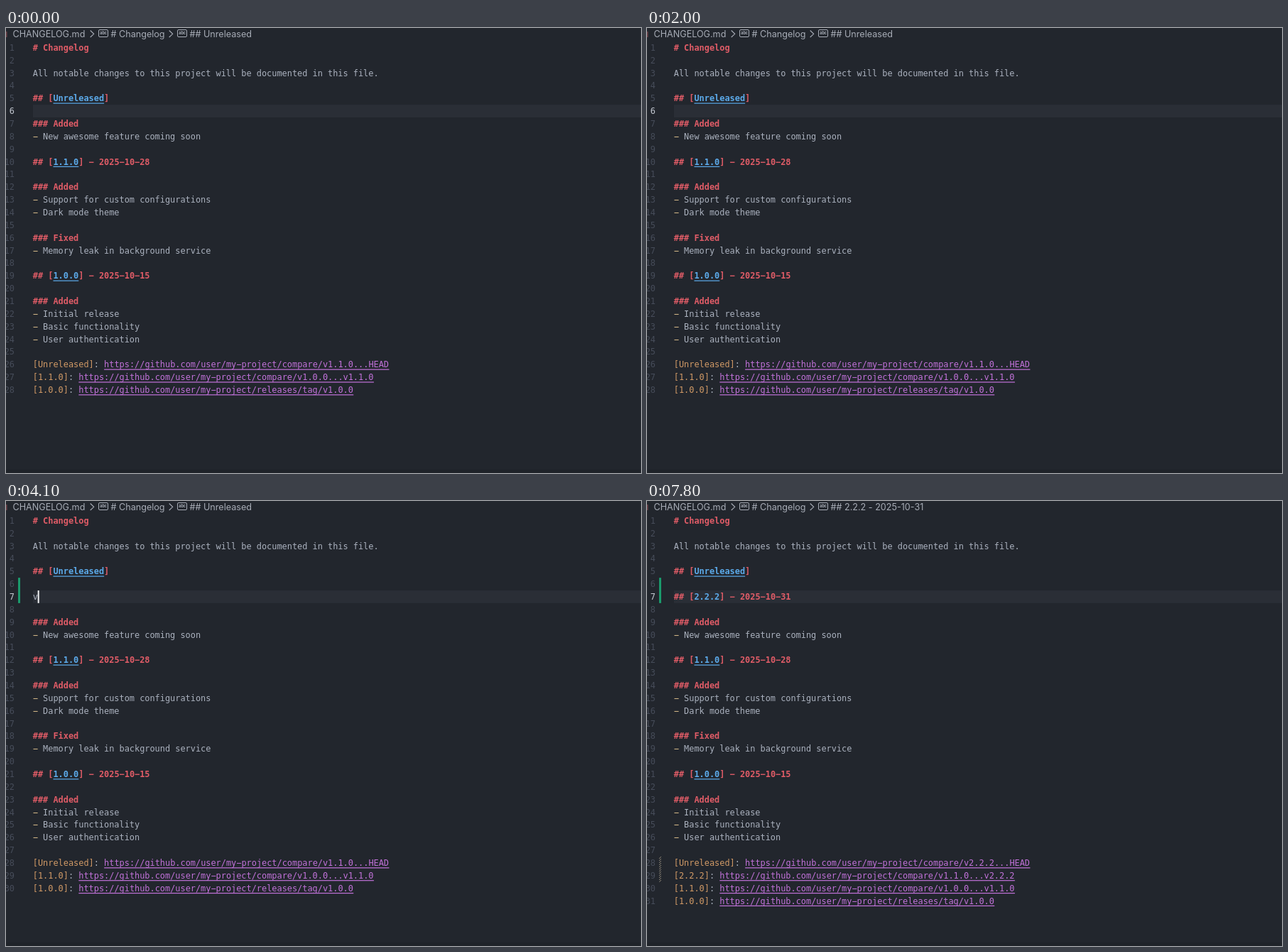
An HTML page with a canvas that plays this animation: 894x627 px, repeating every 8 s.

```html
<!DOCTYPE html>
<html lang="en">
<head>
<meta charset="utf-8">
<title>Changelog editor</title>
<style>
html, body { margin: 0; width: 100%; height: 100%; overflow: hidden; background: #22262d; }
canvas { display: block; width: 894px; height: 627px; }
</style>
</head>
<body>
<canvas id="stage"></canvas>
<script>
const W = 894, H = 627, LOOP = 8000;
const LEFT = 37.8, COL = 7.166, TOP = 18.85, ROW = 17.86;
const MONO = '11.9px "DejaVu Sans Mono", monospace';
const UI = '12.6px Inter, sans-serif';
const C = {
  bg: '#22262d', band: '#2a2e36', text: '#abb2bf', dim: '#464c59',
  red: '#e05c67', blue: '#5cabeb', purple: '#c272da', orange: '#d19a66',
  bullet: '#dcc08e', green: '#1b9a6c', crumb: '#a7acb6'
};
const URL_BASE = 'https://github.com/user/my-project/';

const canvas = document.getElementById('stage');
const ctx = canvas.getContext('2d');
const dpr = window.devicePixelRatio || 1;
canvas.width = W * dpr;
canvas.height = H * dpr;

const compare = (label, from, to) => `[${label}]: ${URL_BASE}compare/v${from}...${to}`;

const BASE = [
  '# Changelog', '',
  'All notable changes to this project will be documented in this file.', '',
  '## [Unreleased]', '',
  '### Added', '- New awesome feature coming soon', '',
  '## [1.1.0] - 2025-10-28', '',
  '### Added', '- Support for custom configurations', '- Dark mode theme', '',
  '### Fixed', '- Memory leak in background service', '',
  '## [1.0.0] - 2025-10-15', '',
  '### Added', '- Initial release', '- Basic functionality', '- User authentication', '',
  compare('Unreleased', '1.1.0', 'HEAD'),
  compare('1.1.0', '1.0.0', 'v1.1.0'),
  `[1.0.0]: ${URL_BASE}releases/tag/v1.0.0`
];

// Edit times in ms
const ENTER1 = 2200, ENTER2 = 2900, UP = 3500, EXPAND = 7100;
const TYPED = 'v2.2.2', TYPE_AT = [4100, 4800, 5000, 5200, 5300, 5400];
const CARET_RESETS = [1400, ENTER1, ENTER2, 3000, UP, ...TYPE_AT, EXPAND];

function editorState(t) {
  const lines = BASE.slice();
  if (t >= ENTER1) lines.splice(5, 0, '');
  if (t >= ENTER2) lines.splice(5, 0, '');
  if (t >= TYPE_AT[0]) lines[6] = TYPED.slice(0, TYPE_AT.filter(k => t >= k).length);
  if (t >= EXPAND) {
    lines[6] = '## [2.2.2] - 2025-10-31';
    lines.splice(27, 1, compare('Unreleased', '2.2.2', 'HEAD'), compare('2.2.2', '1.1.0', 'v2.2.2'));
  }
  const row = t < ENTER1 ? 6 : t < ENTER2 ? 7 : t < UP ? 8 : 7;
  const reset = CARET_RESETS.filter(k => t >= k).pop();
  const caret = reset !== undefined && Math.floor((t - reset) / 500) % 2 === 0;
  return { lines, row, caret };
}

const rowTop = n => TOP + (n - 1) * ROW;

function rect(color, x, y, w, h) {
  ctx.fillStyle = color;
  ctx.fillRect(x, y, w, h);
}

// Splits a Markdown line into [text, color, underlined] parts
function tokens(line) {
  let m;
  if (line[0] === '#') {
    m = line.match(/^(#+ \[)(.+?)(\].*)$/);
    return m
      ? [[m[1], C.red], [m[2], C.blue, m[2] !== '2.2.2'], [m[3], C.red]]
      : [[line, C.red]];
  }
  if ((m = line.match(/^(\[.+?\])(: )(.+)$/)))
    return [[m[1], C.orange], [m[2], C.text], [m[3], C.purple, true]];
  if (line.startsWith('- ')) return [['-', C.bullet], [line.slice(1), C.text]];
  return [[line, C.text]];
}

function drawLine(line, n) {
  const y = rowTop(n);
  let x = LEFT;
  ctx.font = (line[0] === '#' ? 'bold ' : '') + MONO;
  for (const [text, color, underlined] of tokens(line)) {
    const w = text.length * COL;
    ctx.fillStyle = color;
    ctx.fillText(text.replace(/-/g, '\u2212'), x, y + 13); // wide hyphens
    if (underlined) rect(color, x, y + 15.2, w, 1.2);
    x += w;
  }
}

function drawNumber(n, active) {
  ctx.font = MONO;
  ctx.fillStyle = active ? '#c3c8d1' : C.dim;
  ctx.textAlign = 'right';
  ctx.fillText(n, 12, rowTop(n) + 13);
  ctx.textAlign = 'left';
}

function drawGutter(t) {
  const rows = t < 2500 ? 0 : t < 3100 ? 1 : 2;
  if (rows) rect(C.green, 17, rowTop(6), 3, rows * ROW);
  if (t < 7300) return;
  const y = rowTop(28), h = 2 * ROW;
  ctx.save();
  ctx.beginPath();
  ctx.rect(17, y, 3, h);
  ctx.clip();
  ctx.beginPath();
  for (let d = 0; d < h + 4; d += 3) {
    ctx.moveTo(16, y + d + 1);
    ctx.lineTo(21, y + d - 4);
  }
  ctx.strokeStyle = '#8d8678';
  ctx.lineWidth = 1;
  ctx.stroke();
  ctx.restore();
}

function drawSymbol(x) {
  ctx.strokeStyle = C.crumb;
  ctx.lineWidth = 1;
  ctx.beginPath();
  ctx.roundRect(x + 0.5, 2.5, 13, 10, 1.5);
  ctx.stroke();
  ctx.font = 'bold 5.5px Inter, sans-serif';
  ctx.fillText('abc', x + 2.2, 9.2);
}

function drawChevron(x) {
  ctx.strokeStyle = C.crumb;
  ctx.lineWidth = 1.1;
  ctx.beginPath();
  ctx.moveTo(x, 3.5);
  ctx.lineTo(x + 5, 8.3);
  ctx.lineTo(x, 13);
  ctx.stroke();
}

function drawCrumbs(t) {
  rect('#6d4148', 0, 5, 1.5, 8);
  ctx.fillStyle = C.crumb;
  drawSymbol(130);
  drawSymbol(241);
  drawChevron(118.7);
  drawChevron(229.7);
  ctx.font = UI;
  ctx.fillText('CHANGELOG.md', 9.5, 13);
  ctx.fillText('# Changelog', 147.5, 13);
  ctx.fillText(t < 7500 ? '## Unreleased' : '## 2.2.2 - 2025-10-31', 258.5, 13);
}

function drawPointer(t) {
  if (t < 600 || t >= 2000) return;
  const left = Math.pow(1 - Math.min(1, (t - 600) / 600), 3);
  ctx.save();
  ctx.translate(258.5 + 42 * left, 115 + 110 * left);
  ctx.beginPath();
  ctx.moveTo(0, 0);
  for (const [x, y] of [[0, 13], [3, 10.3], [5.2, 15.6], [7.6, 14.6], [5.4, 9.4], [9.3, 9.2]])
    ctx.lineTo(x, y);
  ctx.closePath();
  ctx.fillStyle = '#15171b';
  ctx.fill();
  ctx.strokeStyle = '#f0f0f0';
  ctx.lineWidth = 1.2;
  ctx.lineJoin = 'round';
  ctx.stroke();
  ctx.restore();
}

function draw(t) {
  const { lines, row, caret } = editorState(t);
  ctx.setTransform(dpr, 0, 0, dpr, 0, 0);
  rect(C.bg, 0, 0, W, H);
  rect('#1f2329', 0, 622, W, 5);
  rect(C.band, 38, rowTop(row), W - 38, ROW);
  drawCrumbs(t);
  lines.forEach((line, i) => {
    drawNumber(i + 1, i + 1 === row);
    drawLine(line, i + 1);
  });
  drawGutter(t);
  if (caret) rect('#f2f3f5', LEFT - 0.3 + lines[row - 1].length * COL, rowTop(row), 2, ROW);
  drawPointer(t);
}

const start = performance.now();
function tick() {
  draw((performance.now() - start) % LOOP);
  requestAnimationFrame(tick);
}
tick();
</script>
</body>
</html>
```
